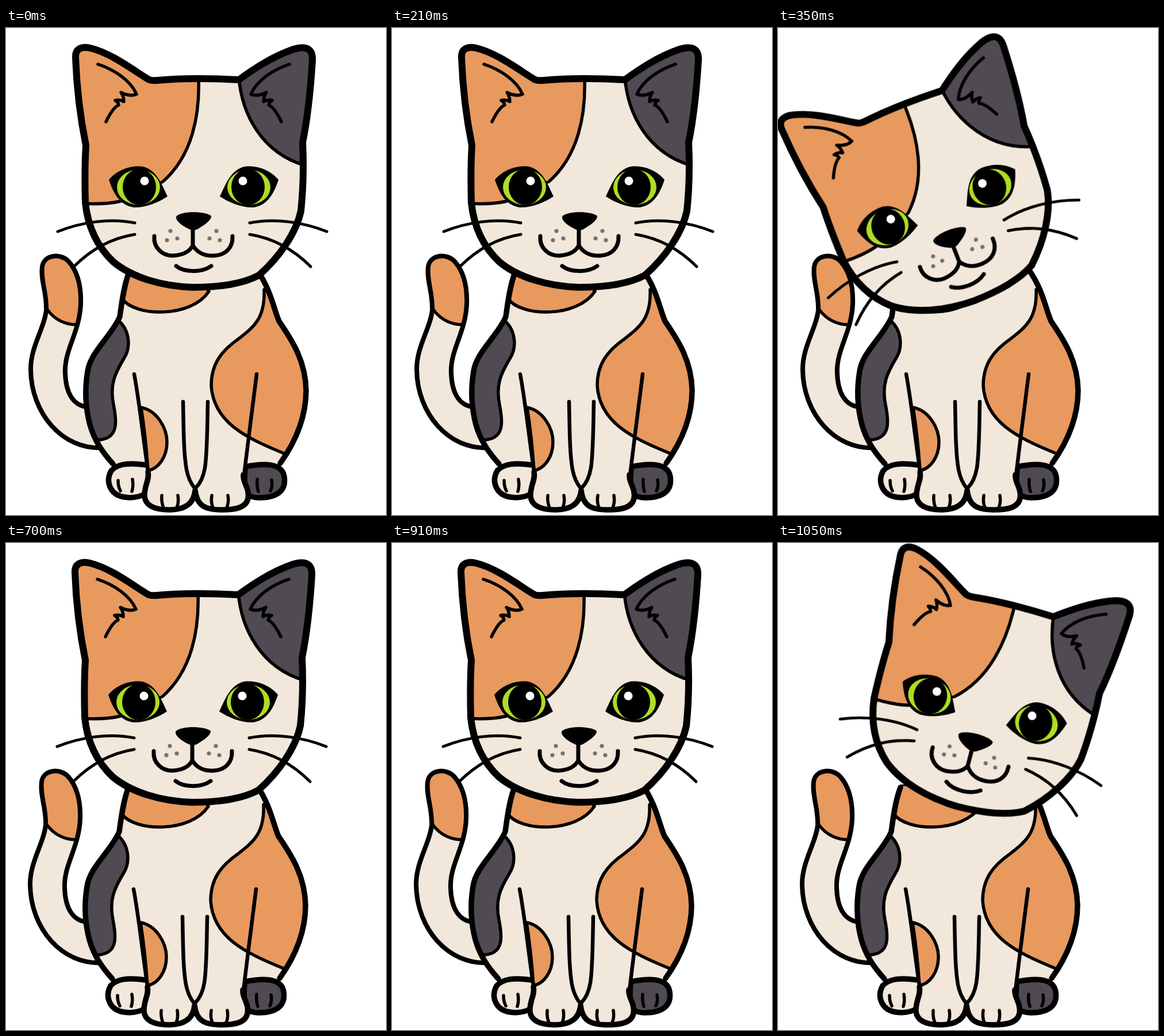
An HTML page for the animation above (1400 ms loop, 661x847 px).

```html
<!DOCTYPE html>
<html lang="en">
<head>
<meta charset="utf-8">
<title>Calico cat tilting its head</title>
<style>
  html, body { margin: 0; width: 100%; height: 100%; overflow: hidden; background: #fff; }
  svg { display: block; width: 100%; height: 100%; }
  path { stroke-linecap: round; stroke-linejoin: round; }
  .ink { fill: none; stroke: #000; stroke-width: 5.5; }
  .outline { fill: none; stroke: #000; }
  .cream { fill: #f1e7da; }
  .orange { fill: #e8995e; }
  .grey { fill: #504a52; }
  .orange, .grey { stroke: #000; stroke-width: 5.5; }
  .w6 { stroke-width: 6.5; }
  .w7 { stroke-width: 7; }
  .w8 { stroke-width: 8; }
  .w9 { stroke-width: 9.5; }
  .w12 { stroke-width: 12; }
</style>
</head>
<body>
<svg viewBox="0 0 661 847" preserveAspectRatio="none">
  <defs>
    <path id="headShape" d="M121 52C120 37 130 31 147 35C184 44 222 74 249 90Q254 92 264 91C305 87 350 87 405 90C430 72 462 50 500 37C522 30 534 36 533 56C530 105 526 150 516 199C518 240 517 280 513 318C505 356 476 398 440 430C410 446 365 451 325 451C270 449 220 434 187 407C155 377 142 342 138 304C137 268 137 236 139 204C129 155 123 105 121 52Z"/>
    <path id="bodyShape" d="M214 420C205 448 201 480 198 502C184 535 147 563 142 597C137 627 138 660 146 690C154 718 168 738 186 758L250 790L410 790L477 757C502 722 522 680 522 630C521 580 499 545 475 510C466 490 461 455 436 420Z"/>
    <path id="tailShape" d="M168 730C98 734 44 670 43 595C42 555 68 520 70 490C71 460 60 440 63 415C66 394 95 391 109 406C125 424 131 450 130 480C128 530 101 560 103 600C104 635 117 656 140 659"/>
    <clipPath id="headClip"><use href="#headShape"/></clipPath>
    <clipPath id="bodyClip"><use href="#bodyShape"/></clipPath>
    <clipPath id="tailClip"><use href="#tailShape"/></clipPath>

    <path id="earFold" class="ink" d="M160 63C190 73 217 92 227 115Q216 120 200 112Q205 119 205 128Q198 124 190 126Q196 130 196 134Q186 138 174 163"/>
    <g id="eye">
      <path d="M179 264C196 244 220 239 238 241C262 247 270 270 281 293C264 304 242 313 222 312C198 308 187 288 179 264Z"/>
      <ellipse cx="230.500" cy="277" rx="37.500" ry="30.500" fill="#b0dc22"/>
      <ellipse cx="232" cy="276.500" rx="29" ry="31.500"/>
      <circle cx="241" cy="266" r="7.500" fill="#fff"/>
    </g>
    <path id="whiskers" class="ink" style="stroke-width:5" d="M224 339C180 330 130 338 90 354M224 359C180 366 145 388 118 415"/>
    <g id="muzzleDots" fill="#77716f">
      <circle cx="286" cy="353" r="3.600"/><circle cx="280" cy="369" r="3.600"/><circle cx="298" cy="366" r="3.600"/>
    </g>
  </defs>

  <g id="body">
    <use href="#tailShape" class="cream"/>
    <path class="orange" clip-path="url(#tailClip)" d="M72 490C85 508 105 517 126 516L150 380L40 380Z"/>
    <use href="#tailShape" class="outline w8"/>

    <use href="#bodyShape" class="cream"/>
    <g clip-path="url(#bodyClip)">
      <path class="grey" d="M195 508C215 525 218 555 205 575C190 600 180 620 187 655C193 685 195 712 165 716L110 720L110 508Z"/>
      <path class="orange" d="M203 472C225 502 322 505 353 458L330 420L200 420Z"/>
      <path class="orange" d="M449 455C451 505 431 520 404 541C374 562 357 585 357 622C361 685 415 712 484 740L560 740L560 455Z"/>
    </g>
    <path class="outline w9" d="M214 425C205 448 201 480 198 502C184 535 147 563 142 597C137 627 138 660 146 690C154 718 168 738 186 758M477 757C502 722 522 680 522 630C521 580 499 545 475 510C466 490 461 455 436 420"/>

    <path class="cream" d="M248 760C215 756 195 757 183 770C172 790 182 813 207 816C222 818 232 816 250 810Z"/>
    <path class="outline w9" d="M244 760C215 756 195 757 183 770C172 790 182 813 207 816C222 818 232 816 242 810"/>
    <path class="grey" style="stroke-width:9.5" d="M416 763C445 757 480 755 484 780C488 806 470 817 440 817C430 817 424 814 414 809Z"/>
    <path class="ink" d="M195 787Q195 798 199 805M220 785Q222 797 219 806M437 785Q436 797 439 806M462 786Q464 797 460 805"/>

    <path class="cream" d="M240 700L247 770C250 786 240 796 241 815C243 832 260 838 285 838C310 838 328 828 329 808C332 830 345 838 375 838C400 838 418 834 422 818C424 800 411 790 414 775L420 715Z"/>
    <path class="orange" d="M235 660C262 665 280 695 280 720C280 747 265 766 247 770Q243 710 235 660Z"/>
    <path class="ink w6" d="M223 602C232 650 238 710 247 770M436 602C430 650 421 720 414 778M308 650C309 700 309 740 314 768Q318 788 328 800M351 650C350 700 350 740 346 765Q342 788 330 800"/>
    <path class="outline w9" d="M247 772C250 786 240 796 241 815C243 832 260 838 285 838C310 838 327 828 329 804C332 830 345 838 375 838C400 838 418 834 421 818C424 800 411 790 413 777"/>
    <path class="ink" d="M271 813Q270 825 274 834M299 813Q301 825 297 834M358 813Q356 825 360 834M386 813Q388 825 384 834"/>
  </g>

  <g id="head">
    <use href="#headShape" class="cream"/>
    <g clip-path="url(#headClip)">
      <path class="orange" d="M335 88C337 150 325 222 272 268L200 301C185 305 165 307 130 305L80 300L80 0L335 0Z"/>
      <path class="grey" d="M405 85C410 150 445 217 520 239L570 239L570 0L405 0Z"/>
      <path class="cream" d="M203 304L240 285L275 269L260 310Z"/>
    </g>
    <use href="#headShape" class="outline w12"/>
    <use href="#earFold"/>
    <use href="#earFold" transform="matrix(-1 0 0 1 653 0)"/>
    <use href="#eye"/>
    <use href="#eye" transform="matrix(-1 0 0 1 653 0)"/>
    <use href="#whiskers"/>
    <use href="#whiskers" transform="matrix(-1 0 0 1 648 0)"/>
    <use href="#muzzleDots"/>
    <use href="#muzzleDots" transform="matrix(-1 0 0 1 652 0)"/>
    <path d="M296 328C304 318 346 318 357 327C358 335 341 345 333 350Q326 353 319 350C309 345 295 337 296 328Z"/>
    <path class="ink w7" d="M325 348L325 378M258 362C256 382 272 396 290 396C308 395 320 388 325 378C332 390 345 397 362 396C382 395 395 382 394 362M296 414C310 425 340 426 357 414"/>
  </g>
</svg>
<script>
  const STEP = 350;

  // Poses place the left pupil at (x, y) and tilt the head around it.
  const headPose = (x, y, tilt) =>
    `translate(${x}px, ${y}px) rotate(${tilt}deg) translate(-229px, -277px)`;

  function playSteps(id, poses) {
    const frames = [...poses, poses[0]].map((transform, i) =>
      ({ transform, offset: i / poses.length, easing: "step-end" }));
    document.getElementById(id).animate(frames, {
      duration: STEP * poses.length,
      iterations: Infinity
    });
  }

  playSteps("head", [
    headPose(229, 277, 0),
    headPose(189, 347, -21.3),
    headPose(228, 277, 0),
    headPose(262, 266, 14.3)
  ]);
  playSteps("body", [0, 0, -1, -1].map(x => `translate(${x}px, 0px)`));
</script>
</body>
</html>
```
